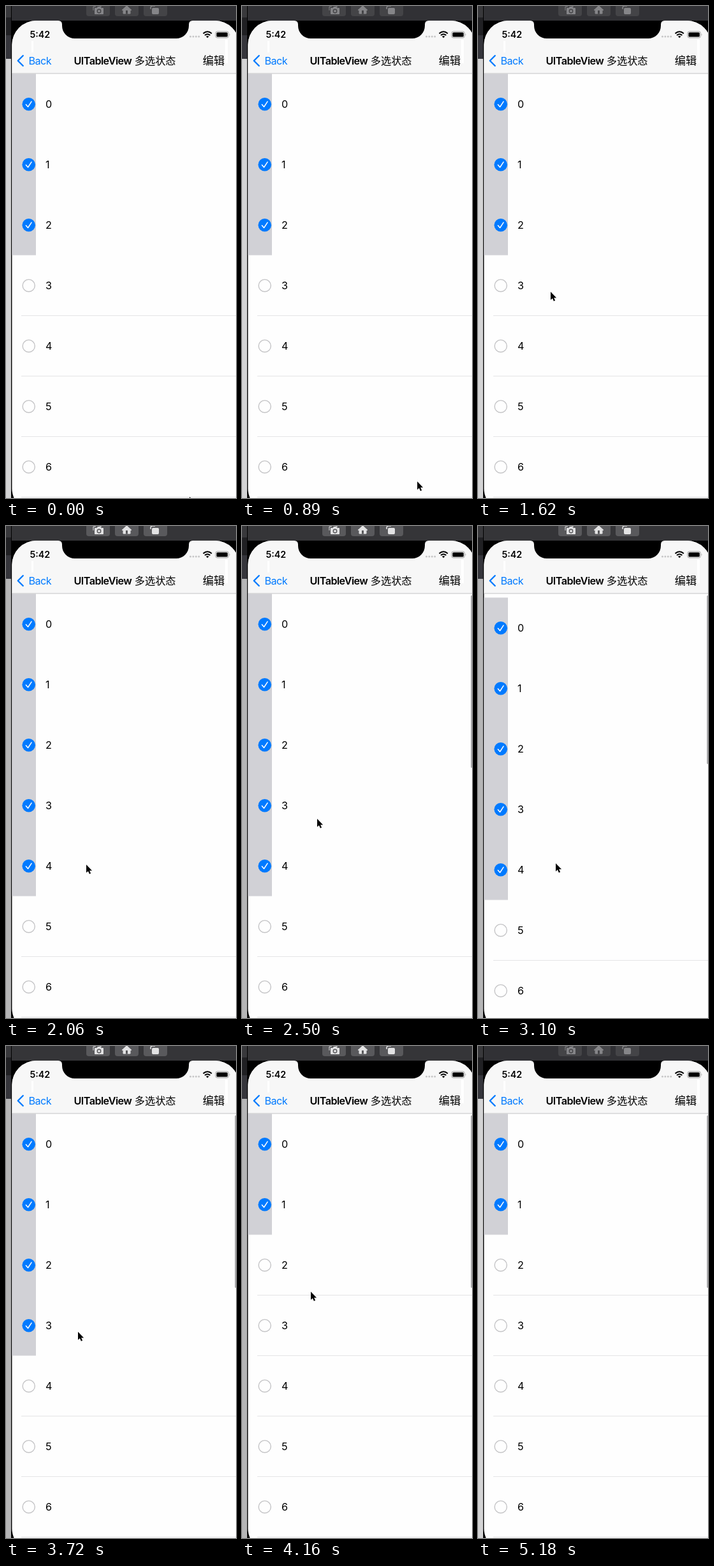
Write an HTML page that moves like this. It is 361 by 773 pixels and loops after 5.28 s.

```html
<!DOCTYPE html>
<html lang="en">
<head>
<meta charset="utf-8">
<title>Multi-select table</title>
<style>
  html, body { margin: 0; width: 100%; height: 100%; overflow: hidden; background: #000; }
  svg { display: block; position: absolute; left: 0; top: 0; }
  text { font: 16.2px Inter, sans-serif; fill: #000; }
  .tight { letter-spacing: -.035em; }
  .semi { font-weight: 600; }
  .cjk { font-family: "Noto Sans CJK SC", "Noto Sans CJK", sans-serif; }
  .toolbar { fill: #313135; }
  .button { fill: #444447; }
  .icon { fill: #858588; stroke: #858588; }
  .hole { fill: #444447; stroke: none; }
  .desk { fill: #d3d3d4; }
  .active .toolbar { fill: #353538; }
  .active .button, .active .hole { fill: #59595c; }
  .active .icon { fill: #e2e2e3; stroke: #e2e2e3; }
  .active .desk { fill: #b5b5b6; }
</style>
</head>
<body>
<svg id="stage" width="361" height="773" viewBox="0 0 361 773">
  <defs>
    <clipPath id="screen"><rect x="9.4" y="23" width="356.6" height="773" rx="38"/></clipPath>
    <clipPath id="table"><rect x="9" y="106" width="352" height="667"/></clipPath>
  </defs>

  <rect width="361" height="773"/>
  <rect class="desk" y="83" width="8" height="690"/>
  <rect width="8" height="18" fill="#38383b"/>
  <rect y="18" width="8" height="28" fill="#202023"/>
  <rect y="46" width="8" height="37" fill="#35353b"/>
  <rect class="toolbar" x="9" width="352" height="23"/>
  <g class="button">
    <rect x="126" y="-8" width="37" height="24" rx="4"/>
    <rect x="171" y="-8" width="37" height="24" rx="4"/>
    <rect x="216" y="-8" width="37" height="24" rx="4"/>
  </g>
  <g class="icon">
    <path d="M137 7v-6h3l1-2h6l1 2h2" fill="none"/>
    <path d="M139.500 3.500h3l1.500-2h4l1.500 2h3v9h-13z"/>
    <circle class="hole" cx="146" cy="8" r="3.400"/><circle cx="146" cy="8" r="1.500"/>
    <path d="M182 6.500l7.500-7 7.500 7h-2v5.500h-11v-5.500z"/>
    <rect class="hole" x="188" y="7" width="3" height="5.500"/>
    <rect x="229.500" y="3.500" width="10" height="9" rx="1"/>
    <path d="M227 5V3q0-3 3-3h4" fill="none" stroke-width="1.500"/>
  </g>

  <g clip-path="url(#screen)">
    <rect x="9" y="23" width="357" height="773" fill="#fefefe"/>
    <g clip-path="url(#table)">
      <g id="list">
        <rect id="band" x="9" width="38" fill="#d1d1d6"/>
      </g>
      <rect id="scroller" x="359.300" y="109" width="3" rx="1.500" fill="#a3a3a5"/>
    </g>
    <rect x="9" y="23" width="357" height="83" fill="#f7f7f7"/>
    <rect x="40" y="55" width="3" height="18" fill="#fff"/>
    <rect x="344" y="53" width="4" height="37" fill="#fff"/>
    <rect x="9" y="105.500" width="357" height="1" fill="#c4c4c6"/>
    <path d="M82 23q6 0 6 6v2a20 20 0 0 0 20 20h159a20 20 0 0 0 20-20v-2q0-6 6-6z"/>
    <text class="semi" x="37.500" y="50" style="font-size:14.300px">5:42</text>
    <path d="M289.500 48h15" stroke="#c6c6c7" stroke-width="3" stroke-linecap="round" stroke-dasharray="0 4.400"/>
    <path d="M309.500 43.300q6.700-6 13.400 0M312 46q4.200-3.600 8.400 0" fill="none" stroke="#000" stroke-width="2"/>
    <path d="M316.200 50.200l-2.300-2.500q2.300-1.600 4.600 0z"/>
    <rect x="328.900" y="40" width="20.500" height="10" rx="2.800" fill="none" stroke="#a1a1a1"/>
    <rect x="330.400" y="41.500" width="17.500" height="7" rx="1.500"/>
    <path d="M350.700 43.300q1.700 1.700 0 3.400z" fill="#a1a1a1"/>
    <path d="M26.700 78l-8 8 8 8" fill="none" stroke="#007aff" stroke-width="2.400" stroke-linecap="round" stroke-linejoin="round"/>
    <text class="tight" x="35.500" y="91.500" style="fill:#007aff">Back</text>
    <text class="tight semi" x="106.500" y="91.500">UITableView</text>
    <text class="cjk" x="201.800" y="91.700" style="font-weight:500">多选状态</text>
    <text class="cjk" x="308.800" y="92" style="font-size:17.200px">编辑</text>
  </g>

  <path id="cursor" d="M0 0v12.800l2.900-2.600 2 4.600 2.200-1-2-4.400h4z" stroke="#fff" stroke-width="1.200" paint-order="stroke"/>
</svg>
<script>
const LOOP = 5280, ROW = 95, TOP = 106.5;
const FIRST_MOVE = 740, TICK = 146.6;
const DRAG = { from: 2490, to: 2900, y: 460 };

// pointer stops: time, x, y
const stops = [
  [740, 288, 771], [1619, 114, 449], [2059, 126, 532], [2499, 118, 460],
  [2790, 122, 528], [3400, 122, 532], [3670, 113, 449], [4110, 108, 386], [4860, 290, 790]
];
const selectTaps = [1770, 2060], deselectTaps = [3400, 3870, 4160];

const $ = id => document.getElementById(id);
const passed = (times, t) => times.filter(time => time <= t).length;
const smooth = u => u * u * (3 - 2 * u);
const move = (el, x, y) => el.setAttribute('transform', `translate(${x} ${y})`);
const show = (el, visible) => { el.style.display = visible ? '' : 'none'; };

// The screen refreshes in even ticks once the pointer starts moving.
const quantize = t => FIRST_MOVE + Math.floor((t - FIRST_MOVE) / TICK) * TICK;

function pointer(t) {
  const next = stops.findIndex(stop => stop[0] > t);
  if (next < 1) return stops.at(next).slice(1);
  const [t0, ...a] = stops[next - 1], [t1, ...b] = stops[next];
  const u = smooth((t - t0) / (t1 - t0));
  return a.map((v, i) => v + (b[i] - v) * u);
}

// Rubber-band pull while dragging, exponential return after release.
function pull(t) {
  if (t < DRAG.from) return 0;
  const drag = 0.55 * Math.max(0, pointer(Math.min(t, DRAG.to))[1] - DRAG.y);
  const offset = drag / (1 + drag / 773);
  return Math.round(offset * Math.exp(-Math.max(0, t - DRAG.to) / 100));
}

function makeRow(i) {
  const row = document.createElementNS('http://www.w3.org/2000/svg', 'g');
  move(row, 0, i * ROW);
  row.innerHTML = `
    <g>
      <circle cx="35.700" cy="47.700" r="10.300" fill="#007aff"/>
      <path d="M31.300 48.300l3.200 3.700 5.500-8.400" fill="none" stroke="#fff" stroke-width="1.500" stroke-linecap="round" stroke-linejoin="round"/>
    </g>
    <g>
      <circle cx="35.700" cy="47.700" r="9.600" fill="none" stroke="#c4c4c6" stroke-width="1.400"/>
      <rect x="24" y="${ROW - 0.5}" width="337" height="1" fill="#e4e4e6"/>
    </g>
    <text x="62" y="53.700">${i}</text>`;
  return $('list').appendChild(row);
}
const rows = Array.from({ length: 7 }, (_, i) => makeRow(i));

function draw(t) {
  const now = quantize(t), offset = pull(now);
  const selected = 3 + passed(selectTaps, t) - passed(deselectTaps, t);
  rows.forEach((row, i) => {
    show(row.children[0], i < selected);
    show(row.children[1], i >= selected);
  });
  $('band').setAttribute('height', selected * ROW);
  $('scroller').setAttribute('height', 271 - offset);
  show($('scroller'), now >= DRAG.from);
  move($('list'), 0, TOP + offset);
  move($('cursor'), ...pointer(now));
  $('stage').classList.toggle('active', t >= selectTaps[0] && t < 5180);
}

const start = performance.now();
function tick() {
  draw((performance.now() - start) % LOOP);
  requestAnimationFrame(tick);
}
tick();
</script>
</body>
</html>
```
